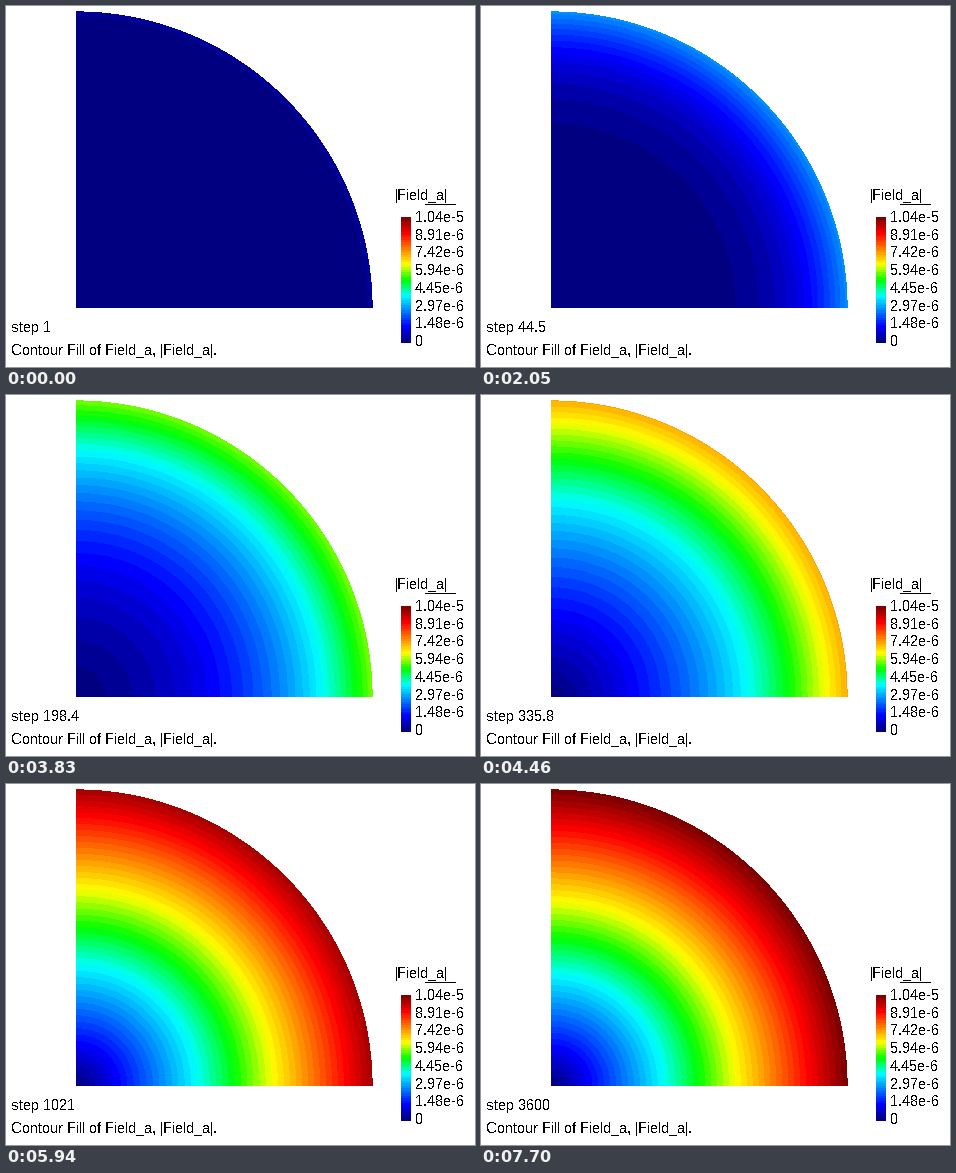
Animation, 469 px wide and 361 px high, one loop 8.36 s. Source, as a matplotlib script:

```python
import numpy as np
import matplotlib.pyplot as plt
from matplotlib.animation import FuncAnimation

W, H, DPI = 469, 361, 64
LOOP, TICK = 8360, 20
CX, CY, RADIUS = 70, 302, 296.6
LEVELS, PEAK = 50, 1.039e-5
DIFFUSION = 6.31e-4
POISSON = 0.3
STEPS, LAST = 107, 3600

plt.rcParams.update({
    "font.family": "Liberation Sans",
    "font.size": 15 * 72 / DPI,
    "text.hinting": "native",
    "text.hinting_factor": 1,
    "text.antialiased": False,
})


def rainbow(v):
    """Dark blue, blue, cyan, green, yellow, red, dark red."""
    red = np.minimum(8 * v - 4, 4.5 - 4 * v)
    green = np.minimum(4 * v - .5, 3.5 - 4 * v)
    blue = np.minimum(4 - 8 * v, .5 + 4 * v)
    rgb = np.clip(np.stack([red, green, blue], axis=-1), 0, 1)
    return np.round(255 * rgb).astype(np.uint8)


PALETTE = rainbow(np.linspace(0, 1, LEVELS))


def colour(value):
    band = np.floor(value * LEVELS).astype(int)
    return PALETTE[np.clip(band, 0, LEVELS - 1)]


def bessel(order, x):
    tau = (np.arange(400) + .5) * np.pi / 400
    return np.cos(order * tau - np.multiply.outer(x, np.sin(tau))).mean(axis=-1)


# Radial displacement of a consolidating cylinder: u' + h u is fixed at the rim
h = POISSON / (1 - POISSON)
k = np.linspace(1, 190, 8000)
f = k * bessel(0, k) - (1 - h) * bessel(1, k)
i = np.flatnonzero(f[:-1] * f[1:] < 0)
ROOTS = k[i] - f[i] * (k[i + 1] - k[i]) / (f[i + 1] - f[i])
R_GRID = np.linspace(0, 1, 300)
MODES = (bessel(1, np.outer(R_GRID, ROOTS)) / bessel(1, ROOTS)
         * 2 * (1 + h) / (ROOTS**2 + h**2 - 1))


def field(time):
    return R_GRID - MODES @ np.exp(-DIFFUSION * ROOTS**2 * time)


def step_value(n):
    return min(20 * (1.05**n - 1), LAST)


def step_at(ms):
    return int(np.interp(ms, [529, 530, 2250, 3170, 5810, 7700],
                         [1, 2, 27, 40, 79, STEPS]))


yy, xx = np.mgrid[:H, :W] + .5
dist = np.hypot(xx - CX, yy - CY) / RADIUS
disk = (dist <= 1) & (xx > CX) & (yy < CY)

base = np.full((H, W, 3), 255, np.uint8)
base[211:337, 395:405] = colour(1 - (np.arange(126) + .5) / 126)[:, None]
base[198, 419:450] = 0


def picture(n):
    img = base.copy()
    img[disk] = colour(np.interp(dist[disk], R_GRID, field(step_value(n))))
    return img


pictures = [picture(n) for n in range(1, STEPS + 1)]

fig = plt.figure(figsize=(W / DPI, H / DPI), dpi=DPI, facecolor="white")
canvas = fig.figimage(pictures[0], 0, 0, origin="upper")


def label(x, y, text):
    return fig.text(x / W, 1 - y / H, text, color="black", va="baseline",
                    parse_math=False)


counter = label(5, 326, "step 1")
label(5, 349, "Contour Fill of Field_a, |Field_a|.")
label(389, 194, "|Field_a|")
label(409, 340, "0")
for j in range(1, 8):
    text = f"{PEAK * j / 7:.2e}".replace("e-0", "e-")
    label(409, round(340 - j * 124 / 7), text)


def update(frame):
    n = step_at(frame * TICK + TICK / 2)
    canvas.set_data(pictures[n - 1])
    counter.set_text(f"step {step_value(n):.4g}")
    return canvas, counter


anim = FuncAnimation(fig, update, frames=LOOP // TICK, interval=TICK,
                     repeat=True, repeat_delay=0, cache_frame_data=False)
plt.show()
```
